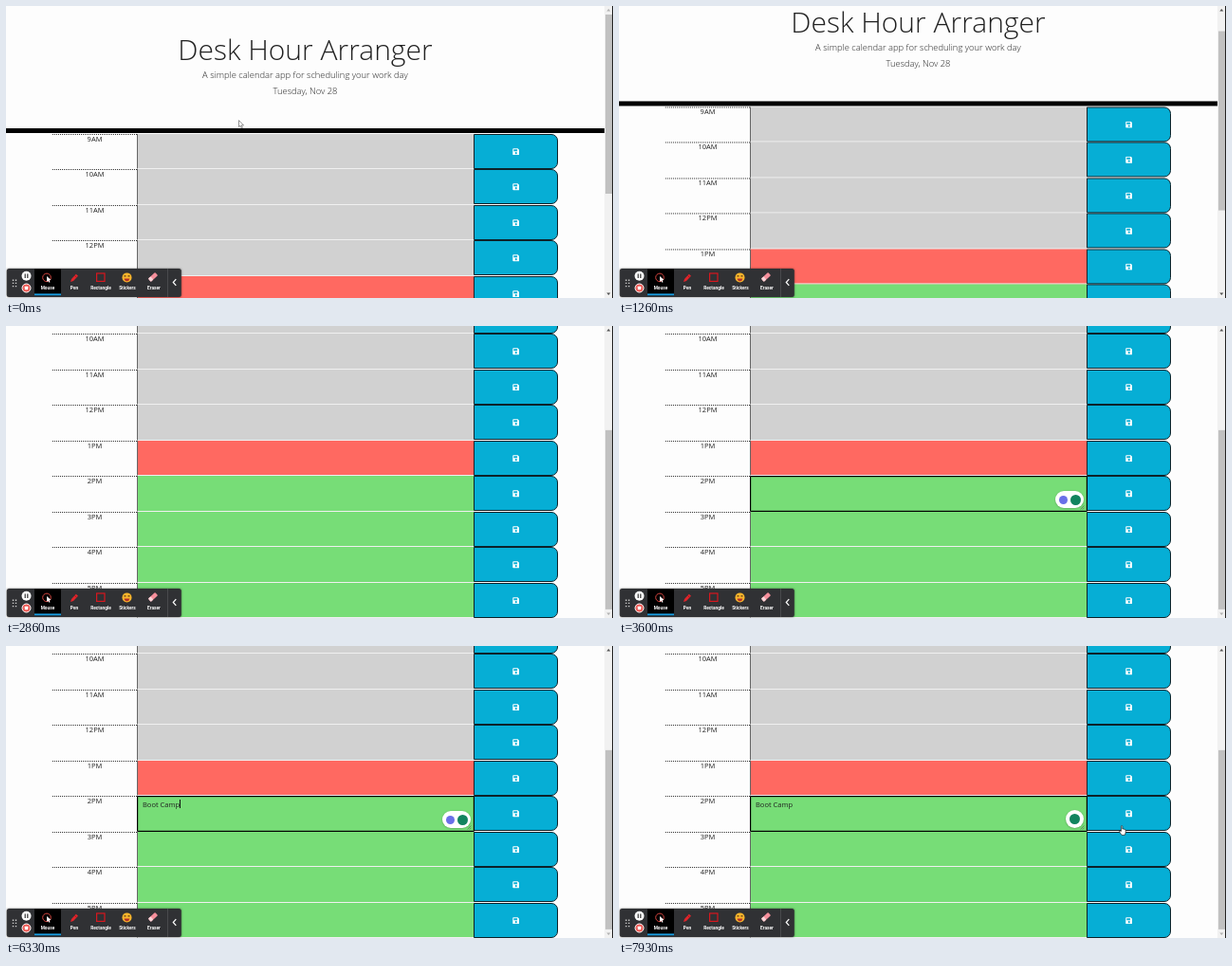
An HTML page that plays this animation: 640 by 308 pixels, repeating every 8 s.

```html
<!DOCTYPE html>
<html lang="en">
<head>
<meta charset="utf-8">
<title>Day planner</title>
<style>
@property --scroll { syntax: "<number>"; inherits: true; initial-value: 0; }

html, body { margin: 0; width: 100%; height: 100%; overflow: hidden; background: #fdfdfd; }
#stage {
  position: relative; width: 640px; height: 308px; overflow: hidden;
  font: 7.5px "Open Sans", sans-serif; color: #222;
  animation: scroll 8s linear infinite;
}
#stage div, #stage svg { position: absolute; box-sizing: border-box; }

#page { left: 0; top: 0; width: 631px; height: 472px; transform: translateY(calc(var(--scroll) * -1px)); }
header { position: absolute; width: 631px; height: 134.4px; box-sizing: border-box; border-bottom: 5px solid #000; font-weight: 300; text-align: center; }
header div { width: 100%; font-size: 9.38px; line-height: 14px; }
header .title { top: 28.3px; font-size: 30px; line-height: 36px; }

.row { left: 49px; width: 533px; height: 37.5px; }
.hour { width: 89px; border-top: 1px dotted #333; line-height: 8.5px; text-align: center; }
.slot { left: 89px; width: 356px; height: 100%; border-left: 1px solid #666; border-bottom: 1px solid #f0f0f0; }
.past { background: #d1d1d1; }
.present { background: #ff6961; }
.future { background: #77dd77; }
.save { left: 444.3px; width: 89px; height: 37.2px; background: #06aed5; border: 1px solid #0d2229; border-radius: 0 7px 7px 0; }
.save svg { left: 39.7px; top: 14.3px; width: 7.5px; height: 7.5px; }

.focus { left: 89px; top: 0; width: 356px; height: 37.5px; border: 1px solid #000; border-radius: 1px; box-shadow: inset 0 0 0 .5px #0006; animation: focus 8s step-end infinite; }
.note { left: 95px; top: 3.7px; height: 10.2px; line-height: 10.2px; white-space: pre; }
.note::before { content: ""; animation: type 8s step-end infinite; }
.caret { right: -1px; top: .5px; width: 1px; height: 9px; background: #111; animation: caret 8s step-end infinite; }
.badge { background: #fff; box-shadow: 0 .5px 2px #0004; }
.badge div { border-radius: 50%; background: #12845f; }
.pill { left: 411px; top: 16px; width: 30px; height: 18px; border-radius: 9px; animation: pill 8s step-end infinite; }
.round { left: 422px; top: 15px; width: 19px; height: 19px; border-radius: 50%; animation: last 8s step-end infinite; }
.grip { left: 437px; top: 30.5px; width: 5px; height: 5px; animation: focus 8s step-end infinite; }

.bar { left: 631px; width: 9px; height: 308px; background: #f1f1f1; border-right: 1px solid #222; }
.bar svg { fill: #505050; }
.up { opacity: calc(.4 + var(--scroll)); }
.down { opacity: calc(164.4 - var(--scroll)); }
.thumb { left: 1px; top: 9px; width: 6.5px; height: 189px; background: #c1c1c1; transform: translateY(calc(var(--scroll) * .615px)); }
.arrow { left: 245px; top: 119.5px; width: 6px; height: 10px; animation: arrow 8s linear infinite; }
.hand { left: 526.5px; top: 188.5px; width: 8px; height: 11px; animation: last 8s step-end infinite; }
.tools { left: 0; top: 274px; width: 190px; height: 34px; filter: drop-shadow(0 0 1px #0008); }
.tools text { font: 700 4.8px Roboto, sans-serif; fill: #fff; text-anchor: middle; }

@keyframes scroll {
  0%, 13.25% { --scroll: 0; }
  14.125% { --scroll: 2.6; }
  15.75% { --scroll: 28; }
  17.5% { --scroll: 105; }
  19% { --scroll: 154; }
  20%, 87.4% { --scroll: 164; }
  88.25% { --scroll: 155; }
  89.12% { --scroll: 137; }
  91% { --scroll: 95; }
  92.5%, 94% { --scroll: 72; }
  96% { --scroll: 125; }
  98.2%, 100% { --scroll: 164; }
}
@keyframes type {
  0% { content: ""; }
  53.2% { content: "B"; }
  54.1% { content: "Bo"; }
  55.7% { content: "Boo"; }
  56.6% { content: "Boot"; }
  57.4% { content: "Boot "; }
  74.9% { content: "Boot C"; }
  76.6% { content: "Boot Ca"; }
  78.2% { content: "Boot Cam"; }
  79.1%, 100% { content: "Boot Camp"; }
}
@keyframes caret {
  0%, 64.1%, 85%, 100% { opacity: 0; }
  49.1%, 69.1% { opacity: 1; }
}
@keyframes focus { 0% { opacity: 0; } 40%, 100% { opacity: 1; } }
@keyframes pill { 0%, 98.2%, 100% { opacity: 0; } 44.2% { opacity: 1; } }
@keyframes last { 0% { opacity: 0; } 98.2%, 100% { opacity: 1; } }
@keyframes arrow {
  0%, .75% { transform: none; opacity: 1; }
  7.4% { transform: translate(22px, 14px); opacity: 1; }
  7.5%, 100% { transform: translate(22px, 14px); opacity: 0; }
}
</style>
</head>
<body>
<div id="stage">
  <div id="page">
    <header>
      <div class="title">Desk Hour Arranger</div>
      <div style="top:66px">A simple calendar app for scheduling your work day</div>
      <div style="top:83px">Tuesday, Nov 28</div>
    </header>
  </div>

  <div class="bar">
    <div class="thumb"></div>
    <svg width="8" height="308"><path class="up" d="M2.3 5.5 4.3 3l2 2.5z"/><path class="down" d="M2.3 302.5l2 2.5 2-2.5z"/></svg>
  </div>

  <svg class="arrow" viewBox="0 0 6 10"><path d="M.5.6v7l1.6-1.4 1.1 2.6 1.2-.5-1.1-2.5h2.2z" fill="#fff" stroke="#666" stroke-width=".7"/></svg>
  <svg class="hand" viewBox="0 0 8 11"><path d="M2.4 6.5V1.4q0-.9.7-.9t.7.9v2.7q.7-.5 1.2.2.7-.4 1.1.3 1-.3 1.1.7v2.4L6.4 10.4H3L.7 7.1q-.4-1 .5-1.1z" fill="#fff" stroke="#222" stroke-width=".7"/></svg>

  <svg class="tools" viewBox="0 274 190 34">
    <rect x=".8" y="277" width="184" height="30" rx="2.5" fill="#303134"/>
    <rect x="30" y="277.5" width="28" height="28" fill="#000"/>
    <rect x="30" y="303.4" width="28" height="1.9" fill="#1a9de0"/>
    <path d="M170.5 277v30" stroke="#55575a" stroke-width=".7"/>
    <path d="M7.5 288.5v8M10.5 288.5v8" stroke="#ccc" stroke-width="1.4" stroke-dasharray="1.4 1.8"/>
    <circle cx="21.5" cy="284.8" r="5" fill="#fff"/>
    <path d="M20.2 282.6v4.4M22.8 282.6v4.4" stroke="#333" stroke-width="1.2"/>
    <circle cx="21.5" cy="297.5" r="4.5" fill="#ec5a55" stroke="#fff"/>
    <rect x="19.8" y="295.8" width="3.4" height="3.4" rx=".4" fill="#fff"/>
    <g transform="translate(0 -.6)">
      <circle cx="43" cy="287" r="4.3" fill="none" stroke="#d5453f" stroke-width="1"/>
      <path d="M43 285.5v6l1.5-1.2 1 2 1-.5-.9-2 1.9-.2z" fill="#fff"/>
      <path d="M68 291.5l1-3 4.8-5.2 2.2 2-4.9 5.2z" fill="#e0252b"/>
      <path d="M72.4 284.9l2.1 2" stroke="#8d1015" stroke-width=".7"/>
      <rect x="95.6" y="282.6" width="8.4" height="8.4" fill="none" stroke="#d8171e" stroke-width="1.2"/>
      <circle cx="127.5" cy="287" r="5" fill="#f9b52c"/>
      <path d="M124.5 285.4h2M128.5 285.4h2" stroke="#5b3a12" stroke-width="1.3"/>
      <path d="M124.6 288h5.8q-.5 2.8-2.9 2.8t-2.9-2.8z" fill="#b3312a"/>
      <g transform="rotate(-42 155 286.5)">
        <rect x="150" y="284.3" width="10" height="4.4" rx="1" fill="#f58f9b"/>
        <rect x="150" y="284.3" width="3.5" height="4.4" rx="1" fill="#f7d5d8"/>
      </g>
      <text x="44" y="299.3">Mouse</text>
      <text x="72" y="299.3">Pen</text>
      <text x="100" y="299.3">Rectangle</text>
      <text x="128" y="299.3">Stickers</text>
      <text x="156" y="299.3">Eraser</text>
    </g>
    <path d="M179.3 288.2l-3 3.3 3 3.3" fill="none" stroke="#fff" stroke-width="1.2"/>
  </svg>
</div>

<script>
const page = document.getElementById("page");
const disk = `<svg viewBox="0 0 14 14"><path fill="#fff" fill-rule="evenodd"
  d="M2 0.5h8.5l3 3V12q0 1.5-1.5 1.5H2Q.5 13.5.5 12V2Q.5.5 2 .5zM2.5 2.5v3.5h7V2.5zM7 7.5a2 2 0 1 0 .01 0z"/></svg>`;
const note = `
  <div class="focus"></div>
  <div class="note"><div class="caret"></div></div>
  <div class="badge pill">
    <div style="left:3.5px;top:4.5px;width:9px;height:9px;background:#6a70e8"></div>
    <div style="left:16px;top:3.5px;width:11px;height:11px"></div>
  </div>
  <div class="badge round"><div style="left:4px;top:4px;width:11px;height:11px"></div></div>
  <svg class="grip" viewBox="0 0 5 5"><path d="M.5 4.5l4-4M2.7 4.5l1.8-1.8" stroke="#555" stroke-width=".6"/></svg>`;

for (let i = 0; i < 9; i++) {
  const hour = 9 + i;
  const label = (hour > 12 ? hour - 12 : hour) + (hour < 12 ? "AM" : "PM");
  const tense = hour < 13 ? "past" : hour > 13 ? "future" : "present";
  page.insertAdjacentHTML("beforeend", `
    <div class="row" style="top:${134.5 + 37.5 * i}px">
      <div class="hour">${label}</div>
      <div class="slot ${tense}"></div>
      <div class="save">${disk}</div>
      ${hour === 14 ? note : ""}
    </div>`);
}
</script>
</body>
</html>
```
